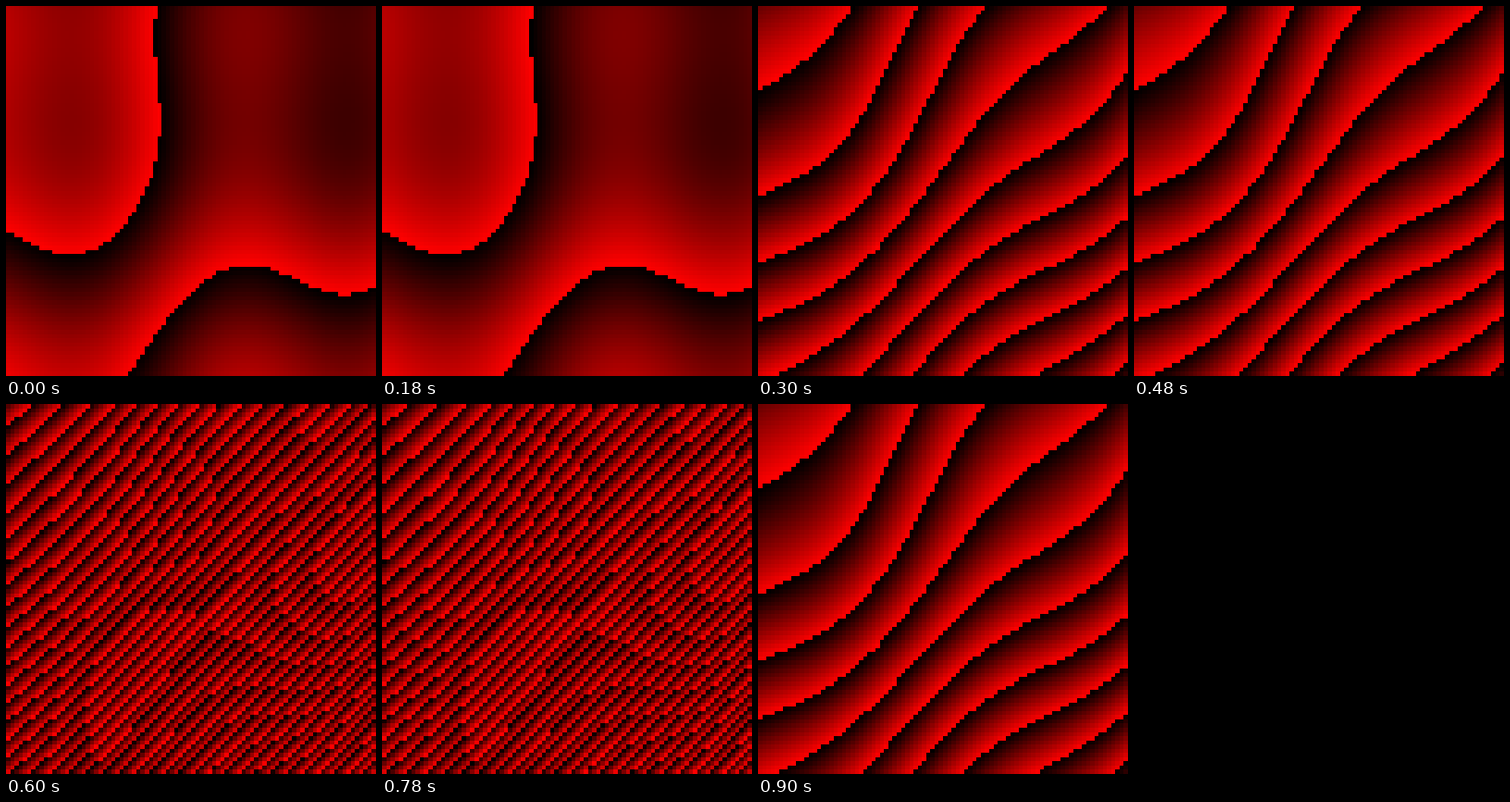
Animation, 400 px wide and 400 px high, one loop 1200 ms. Source, as an HTML page with a canvas:

```html
<!DOCTYPE html>
<html lang="en">
<head>
<meta charset="utf-8">
<title>Red wave bands</title>
<style>
  html, body { margin: 0; width: 100%; height: 100%; overflow: hidden; background: #000; }
  canvas { display: block; width: 100vw; height: 100vh; image-rendering: pixelated; }
</style>
</head>
<body>
<canvas id="view" width="88" height="88"></canvas>
<script>
const CELLS = 88, SIZE = 400, HOLD = 300;
const CHIRPS = [0, 1, 4.75, 1];
const ctx = document.getElementById('view').getContext('2d');
const image = ctx.createImageData(CELLS, CELLS);

// A slope with one sine wave along each axis.
const waveX = x => 0.605 + 0.0024 * x + 0.26 * Math.sin(2 * Math.PI * (x - 163) / 297);
const waveY = y => 0.69 + 0.003 * (y - 300) + 0.27 * Math.sin(0.014 * (y - 300));

// Diagonal bands that tighten towards the lower right.
const bands = s => -0.29 + 0.0063 * s + 4.7e-6 * s * s;

function draw(chirp) {
  for (let row = 0; row < CELLS; row++) {
    for (let col = 0; col < CELLS; col++) {
      const x = col * SIZE / CELLS, y = row * SIZE / CELLS;
      const v = waveX(x) + waveY(y) + chirp * bands(x + y);
      const i = 4 * (row * CELLS + col);
      image.data[i] = Math.floor(256 * (v - Math.floor(v)));
      image.data[i + 3] = 255;
    }
  }
  ctx.putImageData(image, 0, 0);
}

let shown = -1;
function tick() {
  const step = Math.floor(performance.now() / HOLD) % CHIRPS.length;
  if (step !== shown) draw(CHIRPS[shown = step]);
  requestAnimationFrame(tick);
}
tick();
</script>
</body>
</html>
```
